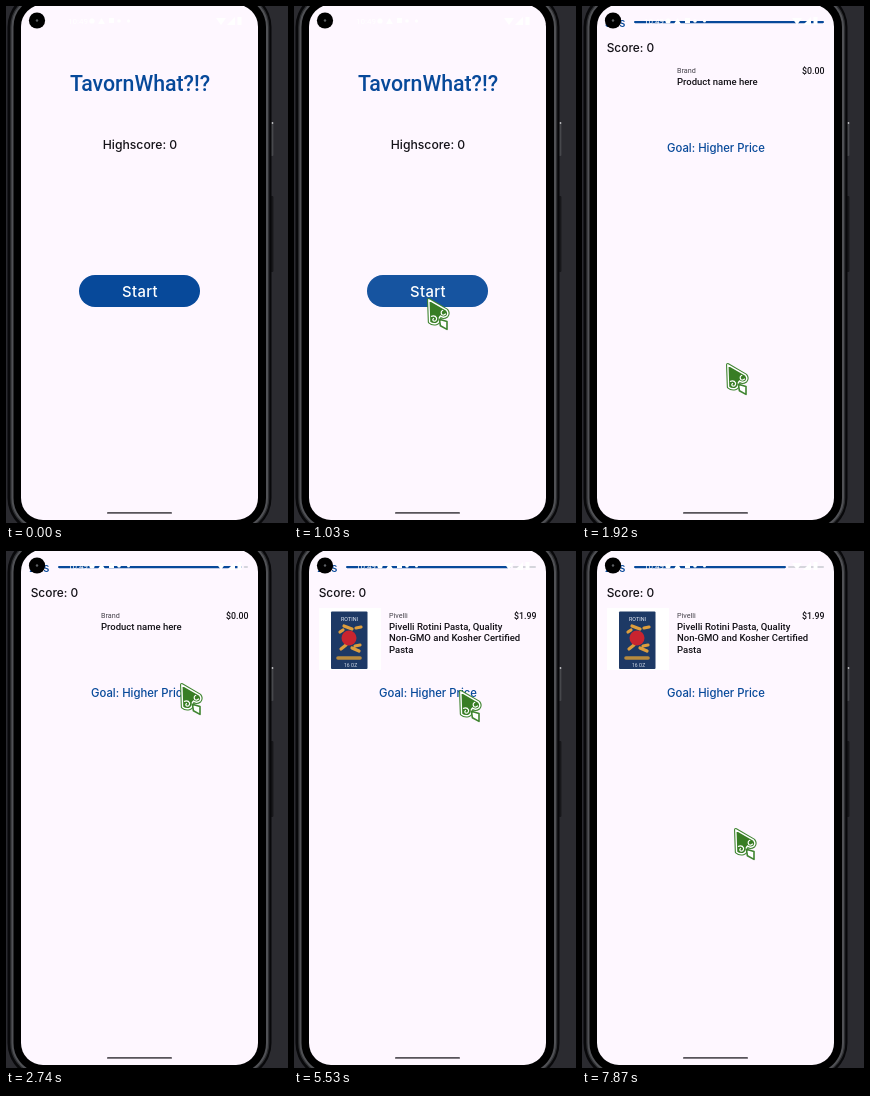
An HTML page for the animation above (8 s loop, 282 px wide and 517 px high).

```html
<!DOCTYPE html>
<html lang="en">
<head>
<meta charset="utf-8">
<title>Price game</title>
<style>
  html, body { margin: 0; width: 100%; height: 100%; overflow: hidden; background: #2b2b30; }
  svg { display: block; width: 282px; height: 517px; }
  text { font-family: Roboto, sans-serif; fill: #141218; }
  .geo { font-family: Inter, sans-serif; font-weight: 500; }
  .blue { fill: #07499a; }
  .white { fill: #fff; }
  .small { font-size: 7.2px; fill: #45424a; }
  .name { font-size: 9.5px; font-weight: 500; }
  .price { font-size: 8.8px; font-weight: 500; }
  .mid { text-anchor: middle; }
  .end { text-anchor: end; }
</style>
</head>
<body>
<svg viewBox="0 0 282 517">
  <defs>
    <clipPath id="clip"><rect x="15" y="-1.5" width="237" height="515.5" rx="22"/></clipPath>
    <path id="arrow" d="M1.8 1.8 L19.6 12.2 Q22 15.2 19.8 18 Q16.5 20.4 13.6 18 L12.4 19.5 Q13 24 9.2 25.6 Q5.2 26.4 2.6 24 Z"/>
    <rect id="band" x="6.5" y="-10" width="254.5" height="533" rx="31"/>
  </defs>

  <!-- phone -->
  <rect width="282" height="517" fill="#2b2b30"/>
  <rect x="264" y="116" width="3.4" height="34" rx="1" fill="#47484c"/>
  <rect x="265.6" y="116" width="1.6" height="2" fill="#b5b5b8"/>
  <rect x="264" y="190" width="3.4" height="76" rx="1" fill="#17171a"/>
  <rect x="1.5" y="-15" width="264" height="543" rx="36" fill="#08080a"/>
  <use href="#band" stroke="#2c2d30" stroke-width="4.6"/>
  <use href="#band" fill="#000" stroke="#505155" stroke-width="2"/>

  <g clip-path="url(#clip)">
    <rect x="15" y="-2" width="237" height="516" fill="#fef7ff"/>

    <g id="home">
      <text class="blue mid" x="134" y="85" font-size="21.3" style="font-weight:500">TavornWhat?!?</text>
      <text class="geo mid" x="134" y="142.5" font-size="12.2">Highscore: 0</text>
      <rect class="blue" x="73" y="269" width="121" height="32" rx="16"/>
      <rect id="glow" class="white" x="73" y="269" width="121" height="32" rx="16"/>
      <text class="geo mid white" x="134" y="290.8" font-size="14.8" letter-spacing=".4">Start</text>
    </g>

    <g id="game">
      <text id="left" class="geo blue end" x="43.5" y="20.5" font-size="11.5"></text>
      <rect id="rest" y="15" height="2" rx="1" fill="#d5d5dc"/>
      <rect id="bar" class="blue" x="52" y="15" height="2.2" rx="1.1"/>
      <text class="geo" x="24.7" y="46" font-size="11.9">Score: 0</text>
      <text class="geo blue mid" x="134" y="146" font-size="11.3">Goal: Higher Price</text>
      <g id="blank">
        <text class="small" x="95" y="66.5">Brand</text>
        <text class="name" x="95" y="79">Product name here</text>
        <text class="price end" x="242.5" y="68">$0.00</text>
      </g>
      <g id="item">
        <text class="small" x="95" y="66.5">Pivelli</text>
        <text class="name" x="95" y="79">Pivelli Rotini Pasta, Quality</text>
        <text class="name" x="95" y="90.4">Non-GMO and Kosher Certified</text>
        <text class="name" x="95" y="101.8">Pasta</text>
        <text class="price end" x="242.5" y="68">$1.99</text>
      </g>
      <g id="photo">
        <rect class="white" x="25" y="57" width="62" height="62"/>
        <rect x="37" y="60.5" width="36.5" height="57.5" rx="1" fill="#1d3965"/>
        <text class="mid" x="55.5" y="70.3" font-size="5.4" style="fill:#e8edf5">ROTINI</text>
        <g stroke="#dd9d3c" stroke-width="3.2" stroke-linecap="round">
          <path d="M50 75l8 3M62 77l5-1M46 81l3-2M47 98l5-4M58 97l7 3M61 95l5-1"/>
          <path d="M44 107h22" stroke="#b78a3e" stroke-width="3.6"/>
        </g>
        <circle cx="55" cy="87" r="7.5" fill="#c9242f"/>
        <text x="50" y="116.3" font-size="5" style="fill:#d5deea">16 OZ</text>
      </g>
    </g>

    <!-- status bar -->
    <g class="white">
      <text class="white" x="62" y="18" font-size="8">10:49</text>
      <circle cx="86" cy="15" r="2.6"/>
      <path d="M92 18l3.5-6 3.5 6zM103 12h5v5h-5z"/>
      <circle cx="113" cy="15" r="1.8"/>
      <circle cx="122.5" cy="15" r="1.5"/>
      <path d="M210 12h10l-5 7zM221 19l8-8v8zM231.5 11h4v8h-4z"/>
    </g>
    <circle cx="31" cy="14.5" r="8.1"/>
    <circle cx="31" cy="14.5" r="1.2" fill="#5d6064"/>
    <rect x="101" y="506" width="65" height="1.8" rx=".9" fill="#57535a"/>
  </g>

  <g id="cursor" stroke-linejoin="round">
    <use href="#arrow" fill="none" stroke="#3f8430" stroke-width="3.6"/>
    <use href="#arrow" fill="#387d24" stroke="#fff" stroke-width="1.4"/>
    <path d="M4 18.5Q8 16.8 9.6 20Q9.6 23.6 6.6 23Q4.8 21.4 7 20.4M18.8 15.6Q17.2 18 14.8 16.4Q13 13.4 16.2 12.2" fill="none" stroke="#fff" stroke-width="1.2"/>
    <path d="M12.4 21.2L20 23.6V31.4L13.4 27.8Z" fill="#fff" stroke="#3f8430" stroke-width="1.6"/>
  </g>
</svg>

<script>
const LOOP = 8000, TICK = 1000 / 15;
const $ = id => document.getElementById(id);

// [tick, value...]; 15 ticks per second
const path = [
  [1, 258, 500], [3, 214, 455], [6, 155, 386], [9, 127, 345], [10, 122, 327],
  [12, 123, 302], [15, 133, 292], [23, 133, 292], [25, 144, 357], [37, 144, 357],
  [41, 174, 132], [70, 174, 132], [73, 165, 139], [114, 165, 139], [118, 152, 277]
];
const slide = [[22, 0], [23, .02], [24, .72], [25, .9], [26, .95], [27, .975], [28, .99], [29, 1]];
const fade = [[23, 0], [24, .6], [25, 1]];

function at(keys, n) {
  const i = keys.findIndex(k => k[0] > n);
  if (i === 0) return keys[0].slice(1);
  if (i < 0) return keys[keys.length - 1].slice(1);
  const a = keys[i - 1], b = keys[i], p = (n - a[0]) / (b[0] - a[0]);
  return a.slice(1).map((v, j) => v + (b[j + 1] - v) * p);
}

const show = (id, on) => $(id).setAttribute("opacity", +on);
const shift = (id, x, y = 0) => $(id).setAttribute("transform", `translate(${x} ${y})`);

function draw(t) {
  const n = Math.floor(t / TICK + .3);

  show("cursor", n >= 1);
  shift("cursor", ...at(path, n));

  const [s] = at(slide, n), [f] = at(fade, n);
  shift("home", -55 * s);
  show("home", 1 - f);
  shift("game", 55 * (1 - s));
  show("game", f);
  show("glow", n < 13 ? 0 : n < 20 ? .06 : .1);

  // the timer loses one of thirty seconds at a time
  const gone = Math.max(0, Math.floor((n - 23) / 15));
  const end = 242 - gone * 190 / 30;
  $("left").textContent = 30 - gone + "s";
  $("bar").setAttribute("width", end - 52);
  $("rest").setAttribute("x", end + 2);
  $("rest").setAttribute("width", Math.max(0, 240 - end));

  show("blank", n < 50);
  show("item", n >= 50);
  show("photo", n >= 51);
}

const start = performance.now();
function frame() {
  draw((performance.now() - start) % LOOP);
  requestAnimationFrame(frame);
}
frame();
</script>
</body>
</html>
```
